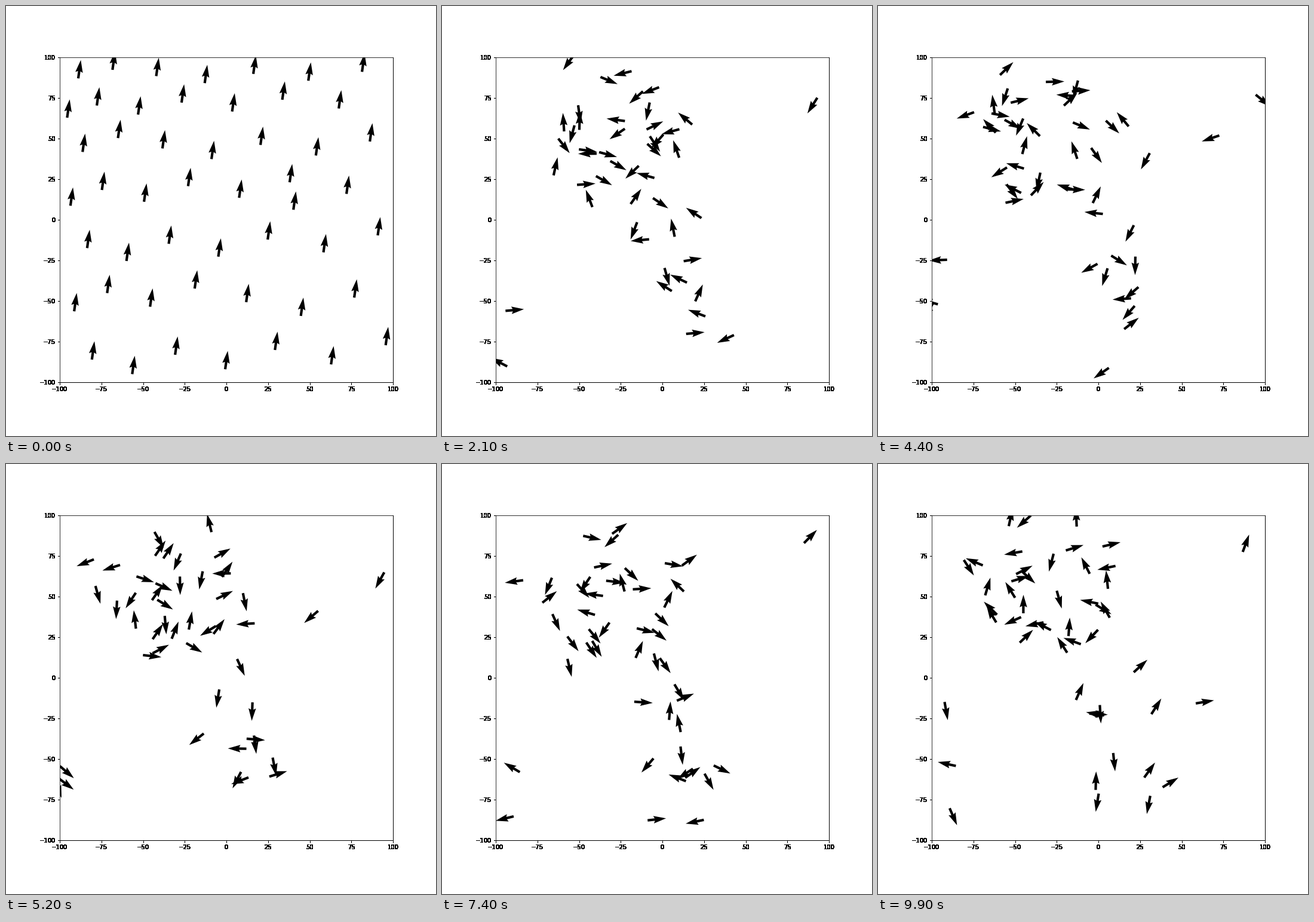
Animation, 720 px wide and 720 px high, one loop 10000 ms. Source, as a matplotlib script:

```python
import matplotlib.pyplot as plt
import numpy as np
from matplotlib.animation import FuncAnimation

FRAMES = 100
LIMIT = 100
STRAYS = [(-95, -50), (-90, -65), (-90, -85), (90, 60), (90, 78)]
TAIL, CLOUD = 13, 32
COUNT = len(STRAYS) + TAIL + CLOUD
rng = np.random.default_rng(11)


def scatter():
    """Even spread over the box, denser at the upper left."""
    i = np.arange(1, COUNT + 1)
    u, v = (i * 0.7549) % 1, (i * 0.5698) % 1
    return np.c_[-97 + 195 * u ** 1.25, 98 - 196 * v ** 1.35]


def formation():
    """Strays near two corners, a slanting tail and a round cloud."""
    i = np.arange(TAIL)
    tail = np.c_[-3 + 2.6 * i + 10 * np.sin(2.4 * i), 5 - 7 * i]
    k = np.arange(CLOUD)
    r = np.sqrt((k + 0.5) / CLOUD)
    a = k * np.pi * (3 - np.sqrt(5))
    cloud = np.c_[-30 + 46 * r * np.cos(a), 52 + 40 * r * np.sin(a)]
    return np.vstack([STRAYS, tail, cloud])


def assign_homes(pos):
    """Give every home to the nearest agent that is still free."""
    homes = np.empty_like(pos)
    free = list(range(COUNT))
    for home in formation():
        i = min(free, key=lambda j: np.hypot(*(pos[j] - home)))
        homes[i] = home
        free.remove(i)
    return homes


def first_headings(pos):
    """Lone agents point up; the others are turned in equal steps."""
    gaps = np.hypot(*(pos[:, None] - pos).T) + 999 * np.eye(COUNT)
    turns = rng.integers(-6, 7, COUNT)
    return np.radians(82 + 26 * turns * (gaps.min(axis=0) < 17))


def push_apart(pos):
    gap = pos[:, None] - pos
    dist = np.hypot(gap[..., 0], gap[..., 1]) + 1e-9
    force = np.clip(1 - dist / 12, 0, 1) / dist
    return 10 * (gap * force[..., None]).sum(axis=1)


def simulate():
    pos = scatter()
    head = first_headings(pos)
    homes = assign_homes(pos)
    spin = np.zeros(COUNT)
    path = []
    for _ in range(FRAMES):
        path.append((pos, head))
        pull = homes - pos
        dist = np.hypot(*pull.T)
        aim = pull + push_apart(pos)
        bearing = np.arctan2(aim[:, 1], aim[:, 0])
        grip = 0.35 * np.minimum(1, np.hypot(*aim.T) / 12)
        spin = 0.9 * spin + rng.normal(0, 0.05, COUNT)
        head = head + spin + grip * np.sin(bearing - head)
        step = 1.2 + 0.05 * dist
        pos = pos + step[:, None] * np.c_[np.cos(head), np.sin(head)]
    return path


def freeze_axes(fig, ax):
    """Keep the drawn axes as a backdrop with hard-edged labels."""
    fig.patch.set_alpha(0)
    fig.canvas.draw()
    backdrop = np.array(fig.canvas.buffer_rgba())
    backdrop[backdrop[..., 3] == 0] = 255
    backdrop[..., 3] = 255
    ax.axis("off")
    fig.patch.set_alpha(1)
    fig.figimage(backdrop, zorder=-1)


path = simulate()
fig = plt.figure(figsize=(10, 10), dpi=72, facecolor="white")
ax = fig.add_axes([0.125, 0.125, 0.775, 0.755])
ticks = np.arange(-LIMIT, LIMIT + 1, 25)
ax.set(xlim=(-LIMIT, LIMIT), ylim=(-LIMIT, LIMIT), xticks=ticks, yticks=ticks)
freeze_axes(fig, ax)

pos, head = path[0]
arrows = ax.quiver(*pos.T, np.cos(head), np.sin(head),
                   scale=18, width=0.0075, color="black")


def draw(n):
    pos, head = path[n]
    arrows.set_offsets(pos)
    arrows.set_UVC(np.cos(head), np.sin(head))
    return arrows,


anim = FuncAnimation(fig, draw, frames=FRAMES, interval=100, repeat=True)
plt.show()
```
